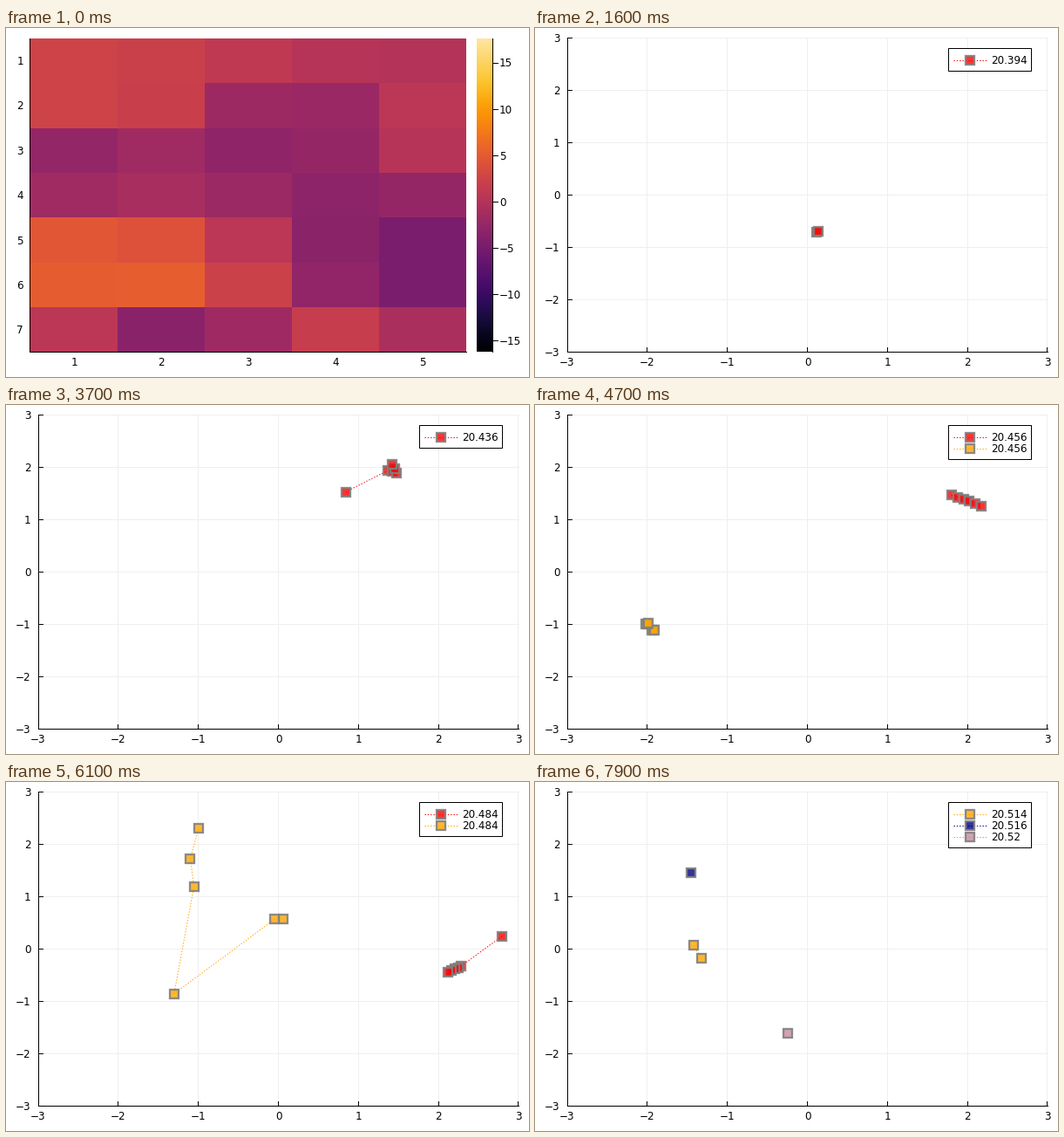
A matplotlib script that plays this animation: 600 by 400 pixels, repeating every 8000 ms.

```python
import numpy as np
import matplotlib.pyplot as plt
from matplotlib.animation import FuncAnimation
from matplotlib.colors import LinearSegmentedColormap, to_rgba
from matplotlib.patches import Rectangle

W, H, DPI = 600, 400, 100
PX = 72 / DPI          # one pixel in points
TICK_MS, TICKS = 100, 80
TRAIL = 6              # ticks a point stays visible
PINK = "#c98ba0"

plt.rcParams["font.family"] = "DejaVu Sans"
fig = plt.figure(figsize=(W / DPI, H / DPI), dpi=DPI, facecolor="white")


def stage():
    ax = fig.add_axes([0, 0, 1, 1])
    ax.axis("off")
    ax.set(xlim=(0, W), ylim=(H, 0))
    return ax


def label(ax, x, y, s, ha="center"):
    s = str(s).replace("-", "\u2212")
    return ax.text(x, y + 4.4, s, ha=ha, va="baseline", fontsize=12 * PX)


def rule(ax, x0, y0, x1, y1, color="black", zorder=1):
    """Straight line, moved half a pixel so that it snaps downwards."""
    ax.plot([x0 - .5, x1 - .5], [y0 - .5, y1 - .5], color=color, lw=PX,
            zorder=zorder)


# Heatmap with colour bar
heat = stage()
LEFT, RIGHT, TOP, BOTTOM = 28, 528, 12, 371.5
LOW, HIGH = -16.2, 17.65
inferno = plt.get_cmap("inferno")
stops = np.append(np.linspace(0, 0.8, 17), 0.86)
cmap = LinearSegmentedColormap.from_list(
    "warm", [(s, inferno(s)) for s in stops] + [(1, "#ffe5a0")])
shade = dict(cmap=cmap, vmin=LOW, vmax=HIGH)


def heat_row(left, middle, right, swing):
    """Five cells: a bent ramp plus one sine wave."""
    col = np.arange(5)
    return np.interp(col, [0, 2, 4], [left, middle, right]) \
        + swing * np.sin(col * np.pi / 2)


cells = [heat_row(2.5, 1, 0, 0.3), heat_row(2.5, -1.8, 0.7, 1.6),
         heat_row(-2.6, -3, 0.3, 1.2), heat_row(-1.6, -2, -2.5, 0.9),
         heat_row(4.6, 0.7, -4.6, 1.4), heat_row(5.2, 2.2, -4.6, 1.6),
         heat_row(0.7, -1.7, -0.7, -2.9)]
heat.pcolormesh(np.linspace(LEFT, RIGHT, 6), np.linspace(TOP, BOTTOM, 8),
                cells, **shade)
ramp = np.linspace(LOW, HIGH, 256)[:, None]
heat.pcolormesh([540, 558], np.linspace(371, TOP, 257), ramp, **shade)
rule(heat, 27.5, TOP, 27.5, BOTTOM)
rule(heat, 27.5, BOTTOM, RIGHT, BOTTOM)
for i in range(5):
    label(heat, 78 + 100 * i, 383, i + 1)
for i in range(7):
    label(heat, 16, TOP + 51.36 * (i + 0.5), i + 1)
rule(heat, 558.5, TOP, 558.5, BOTTOM)
for v in range(-15, 16, 5):
    y = 199.3 - 10.62 * v
    rule(heat, 558.5, y, 564, y)
    label(heat, 566, y, v, "left")
heat.set(xlim=(0, W), ylim=(H, 0))


# Scatter plot frame
plot = stage()
AXIS_X, AXIS_Y, END_X = 37.5, 371.5, 588.5


def sx(x):
    return 312.5 + 91.83 * x


def sy(y):
    return 191.7 - 59.92 * y


for v in range(-3, 4):
    x, y = sx(v), sy(v)
    rule(plot, x, TOP, x, AXIS_Y, "#efefef", 0)
    rule(plot, AXIS_X, y, END_X, y, "#efefef", 0)
    rule(plot, x, AXIS_Y, x, AXIS_Y - 5)
    rule(plot, AXIS_X, y, AXIS_X + 5, y)
    label(plot, x, 383, v)
    label(plot, 28.5, y, v, "right")
rule(plot, AXIS_X, TOP, AXIS_X, AXIS_Y)
rule(plot, AXIS_X, AXIS_Y, END_X, AXIS_Y)


def path(*keys):
    """One point per tick, eased linearly between (tick, degrees, radius)."""
    ticks, angles, radii = zip(*keys)
    points = {}
    for t in range(ticks[0], ticks[-1] + 1):
        a = np.radians(np.interp(t, ticks, angles))
        r = np.interp(t, ticks, radii)
        points[t] = r * np.cos(a), r * np.sin(a)
    return points


# After a short rest, red circles clockwise around the centre
red = path((15, 279, .72), (17, 282, .68)) | path(
    (19, 282, .62), (20, 279.5, .79), (21, 281.6, .9), (22, 297, .6),
    (23, 310, .53), (27, 233, 1.67), (29, 185, 2.45), (32, 61.4, 1.75),
    (33, 55, 2.38), (35, 52.3, 2.4), (37, 55.5, 2.5), (42, 39.4, 2.32),
    (47, 30.3, 2.51), (56, 5.1, 2.8), (57, -8, 2.3), (61, -11.5, 2.16),
    (66, -25, 1.95))
# Orange sways on the left, then jumps in and out
orange = path(
    (40, 184, 2.76), (42, 209.4, 2.24), (44, 210, 2.21), (45, 205.9, 2.25),
    (47, 206.2, 2.22), (48, 210, 2.55), (50, 184, 2.76), (53, 206, 2.33),
    (56, 85, .58), (57, 95, .58), (58, 213, 1.56), (59, 131.5, 1.6),
    (61, 113.4, 2.52), (65, 170, 2.8), (67, 159, 1.4), (74, 168, 1.43))

# colour, points, tick at which the track is dropped
TRACKS = [
    ("lime", path((3, 131.8, 2.334)), 15),
    ("red", red, TICKS),
    ("orange", path((24, 240, 2.2), (26, 240, 2.34)), 27),
    ("orange", orange, 75),
    ("orange", path((75, 177, 1.43), (76, 187.7, 1.34)), TICKS),
    ("navy", path((77, 134.8, 2.07)), TICKS),
    (PINK, path((79, 261.2, 1.63)), TICKS),
]

moving = []


def squares(xs, ys, color, **kw):
    artist, = plot.plot(
        np.array(xs) + .5, ys, color=color, lw=PX, ls=(0, (1.4, 1.9)),
        marker="s", ms=10.2 * PX, mew=2.3 * PX, mfc=to_rgba(color, .8),
        mec=to_rgba("gray", .9), **kw)
    moving.append(artist)


def legend(entries):
    box = Rectangle((474, 23), 95, 13 * len(entries) + 13, fc="white",
                    ec="black", lw=PX, zorder=4)
    moving.append(plot.add_patch(box))
    for i, (color, tick) in enumerate(entries):
        y = 37 + 13 * i
        squares([479.5, 498.6, 517.5], [y] * 3, color, markevery=[1], zorder=5)
        value = round(20.368 + 0.002 * (tick - 3), 3)
        text = label(plot, 523, y, value, "left")
        text.set_zorder(6)
        moving.append(text)


def draw(tick):
    while moving:
        moving.pop().remove()
    heat.set_visible(tick < 3)
    plot.set_visible(tick >= 3)
    if tick < 3:
        return
    # without new points the picture holds
    while not any(tick in points for _, points, _ in TRACKS):
        tick -= 1
    entries = []
    for color, points, stop in TRACKS:
        recent = [t for t in points if tick - TRAIL < t <= tick < stop]
        if recent:
            xs, ys = np.array([points[t] for t in recent]).T
            squares(sx(xs), sy(ys), color, zorder=3)
            entries.append((color, recent[-1]))
    legend(entries)


anim = FuncAnimation(fig, draw, frames=TICKS, interval=TICK_MS,
                     init_func=lambda: None, repeat=True, repeat_delay=0)
plt.show()
```
